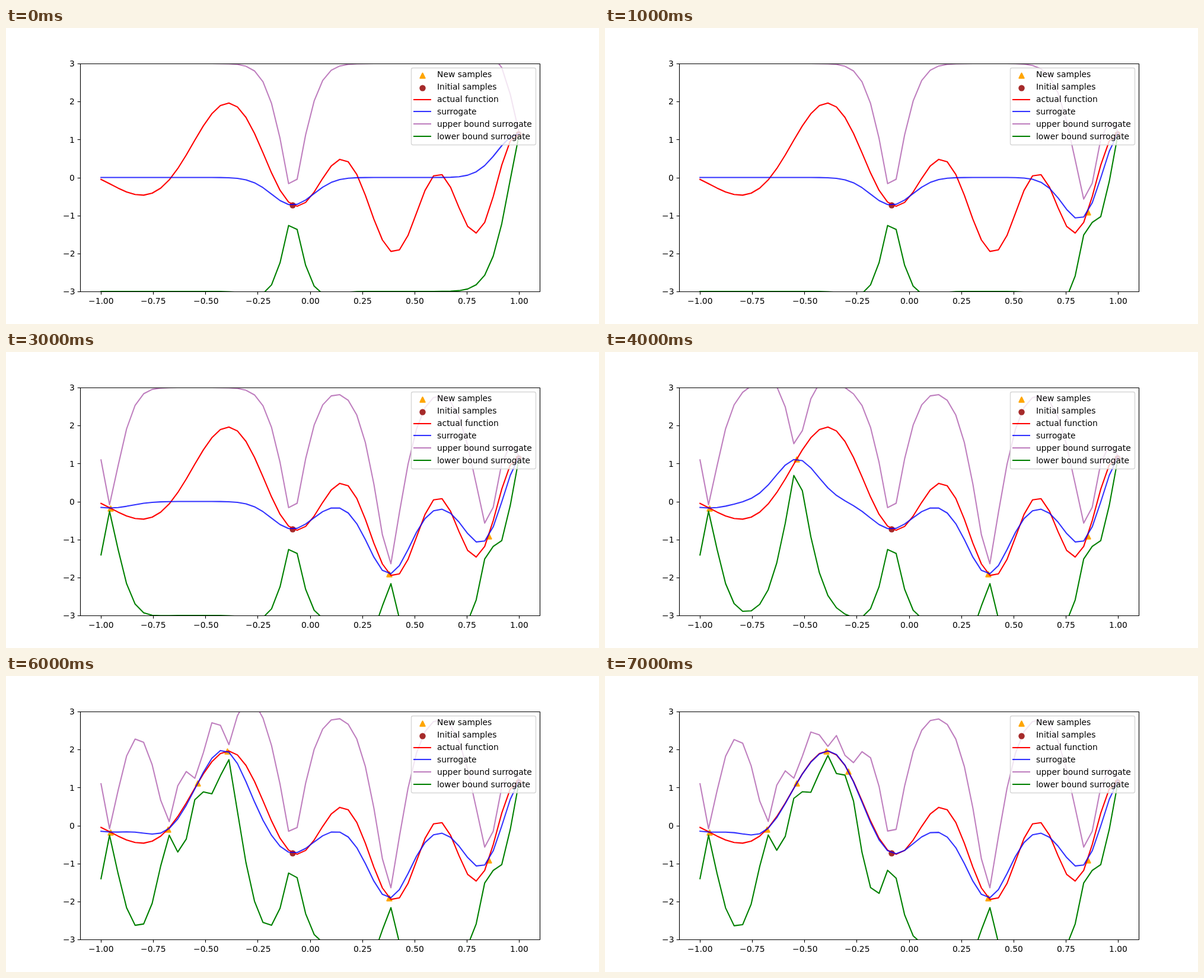
An HTML page with a canvas that plays this animation: 1000 px wide and 500 px high, repeating every 8 s.

```html
<!DOCTYPE html>
<html lang="en">
<head>
<meta charset="utf-8">
<title>Surrogate fitting</title>
<style>
html, body { margin: 0; width: 100%; height: 100%; overflow: hidden; background: #fff; }
canvas { display: block; }
</style>
</head>
<body>
<canvas id="plot" width="1000" height="500"></canvas>
<script>
const ctx = document.getElementById('plot').getContext('2d');
const STEP = 1000, SCALE = 0.1, N = 50;
const BOX = { left: 125, top: 60, right: 900, bottom: 445 };
const ORANGE = '#ffa500', BROWN = '#a52a2a';
const RED = '#ff0000', BLUE = 'rgba(0,0,255,0.8)', PURPLE = 'rgba(128,0,128,0.5)', GREEN = '#008000';
const FONT = '13.89px "DejaVu Sans", sans-serif';

const px = x => 512.5 + 352.27 * x;
const py = y => 252.5 - 64.167 * y;
const grid = Array.from({ length: N }, (_, i) => -1 + 2 * i / (N - 1));

const truth = x => Math.sin(3 * (x + 2) ** 2) - Math.sin(10 * x / 3);

// The first two samples are given, then one is added per step
const samples = [-0.0835, 0.998, 0.8548, -0.9563, 0.379, -0.537, -0.681, -0.3957, -0.29];
const START = 2, STEPS = samples.length - START + 1;

const kernel = (a, b) => Math.exp(-((a - b) ** 2) / (2 * SCALE * SCALE));

function solve(matrix, rhs) {
  const m = matrix.map((row, i) => [...row, rhs[i]]);
  const n = m.length;
  for (let c = 0; c < n; c++) {
    for (let r = 0; r < n; r++) {
      if (r === c) continue;
      const f = m[r][c] / m[c][c];
      for (let j = c; j <= n; j++) m[r][j] -= f * m[c][j];
    }
  }
  return m.map((row, i) => row[n] / row[i]);
}

const dot = (a, b) => a.reduce((sum, v, i) => sum + v * b[i], 0);

// Gaussian process mean with a band of three deviations
function fit(count) {
  const xs = samples.slice(0, count);
  const ys = xs.map(truth);
  const K = xs.map(a => xs.map(b => kernel(a, b)));
  const mean = [], upper = [], lower = [];
  for (const x of grid) {
    const k = xs.map(a => kernel(a, x));
    const w = solve(K, k);
    const mu = dot(w, ys);
    const band = 3 * Math.sqrt(Math.max(0, 1 - dot(w, k)));
    mean.push(mu);
    upper.push(mu + band);
    lower.push(mu - band);
  }
  return { xs, mean, upper, lower };
}

const fits = Array.from({ length: STEPS }, (_, i) => fit(START + i));
const actual = grid.map(truth);

function curve(values, color) {
  ctx.beginPath();
  values.forEach((y, i) => ctx.lineTo(px(grid[i]), py(y)));
  ctx.strokeStyle = color;
  ctx.stroke();
}

function segment(x1, y1, x2, y2) {
  ctx.beginPath();
  ctx.moveTo(x1, y1);
  ctx.lineTo(x2, y2);
  ctx.stroke();
}

// Markers sit on pixel centres
const snap = v => Math.round(v) + 0.5;

function disc(x, y) {
  ctx.fillStyle = BROWN;
  ctx.beginPath();
  ctx.arc(snap(x), snap(y), 5.2, 0, 2 * Math.PI);
  ctx.fill();
}

function triangle(x, y) {
  const r = 4.17, cx = snap(x), cy = snap(y);
  ctx.fillStyle = ctx.strokeStyle = ORANGE;
  ctx.beginPath();
  ctx.moveTo(cx, cy - r);
  ctx.lineTo(cx - r, cy + r);
  ctx.lineTo(cx + r, cy + r);
  ctx.closePath();
  ctx.fill();
  ctx.stroke();
}

function drawData({ xs, mean, upper, lower }) {
  ctx.save();
  ctx.beginPath();
  ctx.rect(BOX.left, BOX.top, BOX.right - BOX.left, BOX.bottom - BOX.top);
  ctx.clip();
  ctx.lineWidth = 2.08;
  ctx.lineJoin = 'round';
  xs.forEach((x, i) => (i < START ? disc : triangle)(px(x), py(truth(x))));
  ctx.lineCap = 'square';
  curve(actual, RED);
  curve(mean, BLUE);
  curve(upper, PURPLE);
  curve(lower, GREEN);
  ctx.restore();
}

// Places text by its inked width, on whole pixels
function label(v, digits, x, y, align) {
  const text = (v < 0 ? '\u2212' : '') + Math.abs(v).toFixed(digits);
  const ink = ctx.measureText(text).width - 0.9;
  ctx.fillText(text, Math.round(x - align * ink), Math.round(y));
}

function drawAxes() {
  ctx.strokeStyle = ctx.fillStyle = '#000';
  ctx.lineWidth = 1.11;
  ctx.strokeRect(BOX.left + 0.5, BOX.top + 0.5, BOX.right - BOX.left, BOX.bottom - BOX.top);
  for (let v = -1; v <= 1; v += 0.25) {
    const x = snap(px(v));
    segment(x, BOX.bottom + 0.5, x, BOX.bottom + 5.36);
    label(v, 2, px(v), 466, 0.5);
  }
  for (let v = -3; v <= 3; v++) {
    const y = snap(py(v));
    segment(BOX.left + 0.5, y, BOX.left - 4.36, y);
    label(v, 0, 115.3, py(v) + 5.3, 1);
  }
}

const legend = [
  ['New samples', () => triangle(702, 80)],
  ['Initial samples', () => disc(702, 101)],
  ['actual function', RED],
  ['surrogate', BLUE],
  ['upper bound surrogate', PURPLE],
  ['lower bound surrogate', GREEN]
];

function drawLegend() {
  ctx.beginPath();
  ctx.roundRect(683.5, 67.5, 210, 130, 2.8);
  ctx.fillStyle = 'rgba(255,255,255,0.8)';
  ctx.fill();
  ctx.strokeStyle = 'rgba(204,204,204,0.8)';
  ctx.lineWidth = 1.39;
  ctx.stroke();
  ctx.lineWidth = 2.08;
  ctx.lineJoin = 'round';
  legend.forEach(([text, mark], i) => {
    if (typeof mark === 'function') mark();
    else {
      const y = Math.round(120.5 + 20.9 * (i - 2));
      ctx.strokeStyle = mark;
      segment(687, y, 717, y);
    }
    ctx.fillStyle = '#000';
    ctx.fillText(text, 727, Math.round(83 + 20.9 * i));
  });
}

function draw(now) {
  ctx.fillStyle = '#fff';
  ctx.fillRect(0, 0, 1000, 500);
  ctx.font = FONT;
  drawData(fits[Math.floor(now / STEP) % STEPS]);
  drawAxes();
  drawLegend();
}

function tick() {
  draw(performance.now());
  requestAnimationFrame(tick);
}
tick();
</script>
</body>
</html>
```
